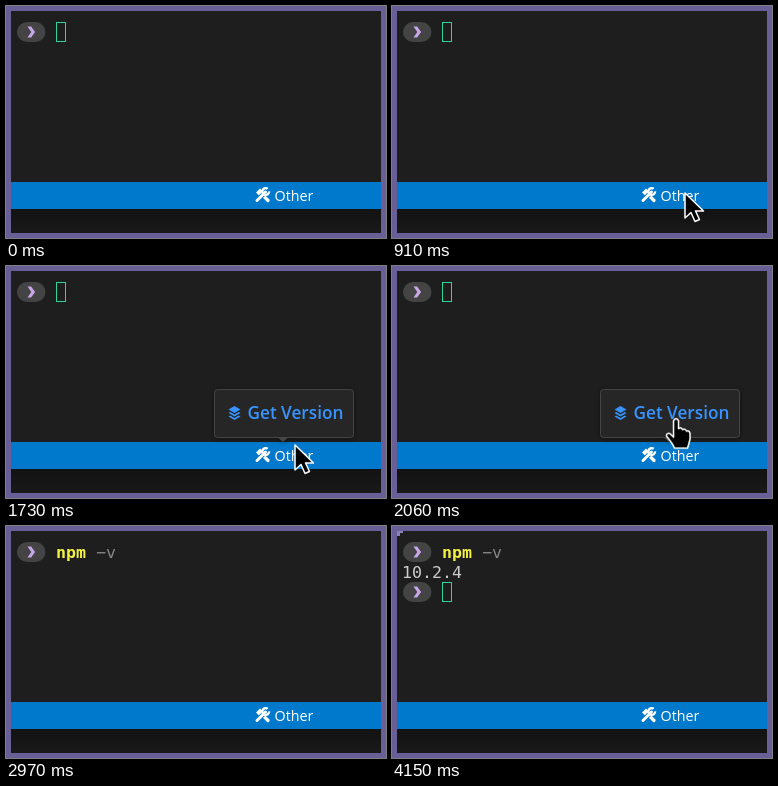
Animation of 380x232 px, one loop 4.25 s. Source, as an HTML page:

```html
<!DOCTYPE html>
<html lang="en">
<head>
<meta charset="utf-8">
<title>Status bar command</title>
<style>
html, body { margin: 0; width: 100%; height: 100%; overflow: hidden; background: #685f97; }
svg { display: block; width: 380px; height: 232px; }

.mono { font: 16.6px "DejaVu Sans Mono", monospace; white-space: pre; }
.ui { font: 14.3px "Open Sans", "Noto Sans", sans-serif; fill: #fff; }
.link { font: 600 17.2px "Open Sans", "Noto Sans", sans-serif; fill: #3794ff; }
.hollow { fill: none; stroke: #2fd49c; }
.pointer path { fill: #000; stroke: #fff; stroke-width: 1.5; stroke-linejoin: round; }

/* one shared 4250 ms loop */
.loop { animation: 4.25s linear infinite; }
.cut { animation-timing-function: step-end; }

.idle { animation-name: idle; }
.command { animation-name: command; }
.block { animation-name: block; }
.output { animation-name: output; }
.next { animation-name: next; }
.corner { animation-name: corner; }
.tip { animation-name: tip; }
.pointer { animation-name: move; }
.beam { animation-name: beam; }
.arrow { animation-name: arrow; }
.hand { animation-name: hand; }

@keyframes idle { 0% { opacity: 1 } 52%, 100% { opacity: 0 } }
@keyframes command { 0% { opacity: 0 } 52%, 100% { opacity: 1 } }
@keyframes block { 0% { opacity: 0 } 52% { opacity: 1 } 69.88%, 100% { opacity: 0 } }
@keyframes output { 0% { opacity: 0 } 79.76%, 100% { opacity: 1 } }
@keyframes next { 0% { opacity: 0 } 83.52%, 100% { opacity: 1 } }
@keyframes corner { 0% { opacity: 0 } 97.64%, 100% { opacity: 1 } }
@keyframes tip {
  0%, 30% { opacity: 0 }
  34.12%, 64.7% { opacity: 1 }
  65.64%, 100% { opacity: 0 }
}
@keyframes move {
  0%, 9.88% { transform: translate(326px, 245px) }
  12.94% { transform: translate(319px, 226px) }
  21.41% { transform: translate(293px, 187px); animation-timing-function: ease-out }
  24.94% { transform: translate(290px, 184px) }
  38.3% { transform: translate(290px, 184px); animation-timing-function: ease-in }
  40.71% { transform: translate(289px, 179px); animation-timing-function: cubic-bezier(.3, .4, .5, 1) }
  49.18%, 100% { transform: translate(284px, 152px) }
}
@keyframes beam { 0% { opacity: 1 } 16.94%, 100% { opacity: 0 } }
@keyframes arrow { 0% { opacity: 0 } 16.94% { opacity: 1 } 44.47%, 100% { opacity: 0 } }
@keyframes hand { 0% { opacity: 0 } 44.47% { opacity: 1 } 65.64%, 100% { opacity: 0 } }
</style>
</head>
<body>
<svg viewBox="0 0 380 232">
  <defs>
    <linearGradient id="floor" x2="0" y2="1">
      <stop stop-color="#121212"/>
      <stop offset="1" stop-color="#191919"/>
    </linearGradient>
    <clipPath id="screen"><rect x="5" y="5" width="370" height="222"/></clipPath>
    <filter id="shadow" x="-10%" y="-20%" width="120%" height="150%">
      <feDropShadow dx="0" dy="1" stdDeviation="2" flood-opacity=".45"/>
    </filter>
    <g id="prompt">
      <rect x="11" y="16" width="28.5" height="20" rx="10" fill="#444"/>
      <path d="M21.5 20.5h3.6l4 5.5-4 5.5h-3.6l3.8-5.5z" fill="#cba6ea"/>
    </g>
  </defs>

  <rect width="380" height="232" fill="#685f97"/>
  <g clip-path="url(#screen)">
    <rect x="5" y="5" width="370" height="222" fill="#1e1e1e"/>
    <rect x="5" y="203" width="370" height="24" fill="url(#floor)"/>
    <rect x="5" y="176" width="370" height="27" fill="#0078cc"/>

    <use href="#prompt"/>
    <rect class="hollow loop cut idle" x="50.5" y="16.5" width="9" height="19"/>
    <g class="mono loop cut command">
      <text x="50" y="32" font-weight="700" fill="#f3f243">npm</text>
      <text x="90" y="32" fill="#868686">−v</text>
    </g>
    <rect class="loop cut block" x="10" y="36" width="10" height="20" fill="#00ffa8"/>
    <text class="mono loop cut output" x="10" y="52" fill="#ccc">10.2.4</text>
    <g class="loop cut next">
      <use href="#prompt" y="40"/>
      <rect class="hollow" x="50.5" y="56.5" width="9" height="19"/>
    </g>
    <path class="loop cut corner" d="M5 5h6v2H8v3H5z" fill="#8a82b6"/>

    <!-- hammer and wrench -->
    <g transform="translate(256.5 189)" fill="none" stroke="#fff">
      <path d="M-2-2 5.5 5.5" stroke-width="3.2" stroke-linecap="round"/>
      <path d="M-6.5-2.5-2.5-6.5 1.2-2.8-2.8 1.2z" fill="#fff" stroke="none"/>
      <path d="M-5.5 5.5 3-3" stroke="#0078cc" stroke-width="4.6"/>
      <path d="M-5.5 5.5 3-3" stroke-width="3" stroke-linecap="round"/>
      <path d="M5.2-6.2A3.4 3.4 0 1 0 6.6-3.6" stroke-width="2.4"/>
    </g>
    <text class="ui" x="268.5" y="195">Other</text>

    <g class="loop tip">
      <g filter="url(#shadow)">
        <path d="M272 171.5 277 176 282 171.5z" fill="#454545"/>
        <rect x="208.5" y="123.5" width="139" height="48" rx="3" fill="#252526" stroke="#454545"/>
      </g>
      <g fill="#3794ff">
        <path d="M228.5 140 234.5 143.5 228.5 147 222.5 143.5z"/>
        <path id="sheet" d="M222.5 147 224.2 146 228.5 148.5 232.8 146 234.5 147 228.5 150.5z"/>
        <use href="#sheet" y="3.5"/>
      </g>
      <text class="link" x="241.5" y="153">Get Version</text>
    </g>

    <g class="pointer loop">
      <path class="loop cut beam" d="M-8-14H8v3.5H2v21H8V14H-8V10.5H-2v-21H-8z"/>
      <path class="loop cut arrow" d="M0 0V25L6 19.5 10 28.5 14.5 26.5 10.5 18H18.5z"/>
      <path class="loop cut hand" d="M-2.5 19V2.5Q0-1.5 2.5 2.5V10.5Q5 8.5 6.5 11.5 9 10 10.5 13 13 12 14 15V21Q13 25 11.5 30H-1.5Q-3 26-9.5 18-10 14.5-6 15.5z"/>
    </g>
  </g>
</svg>
</body>
</html>
```
